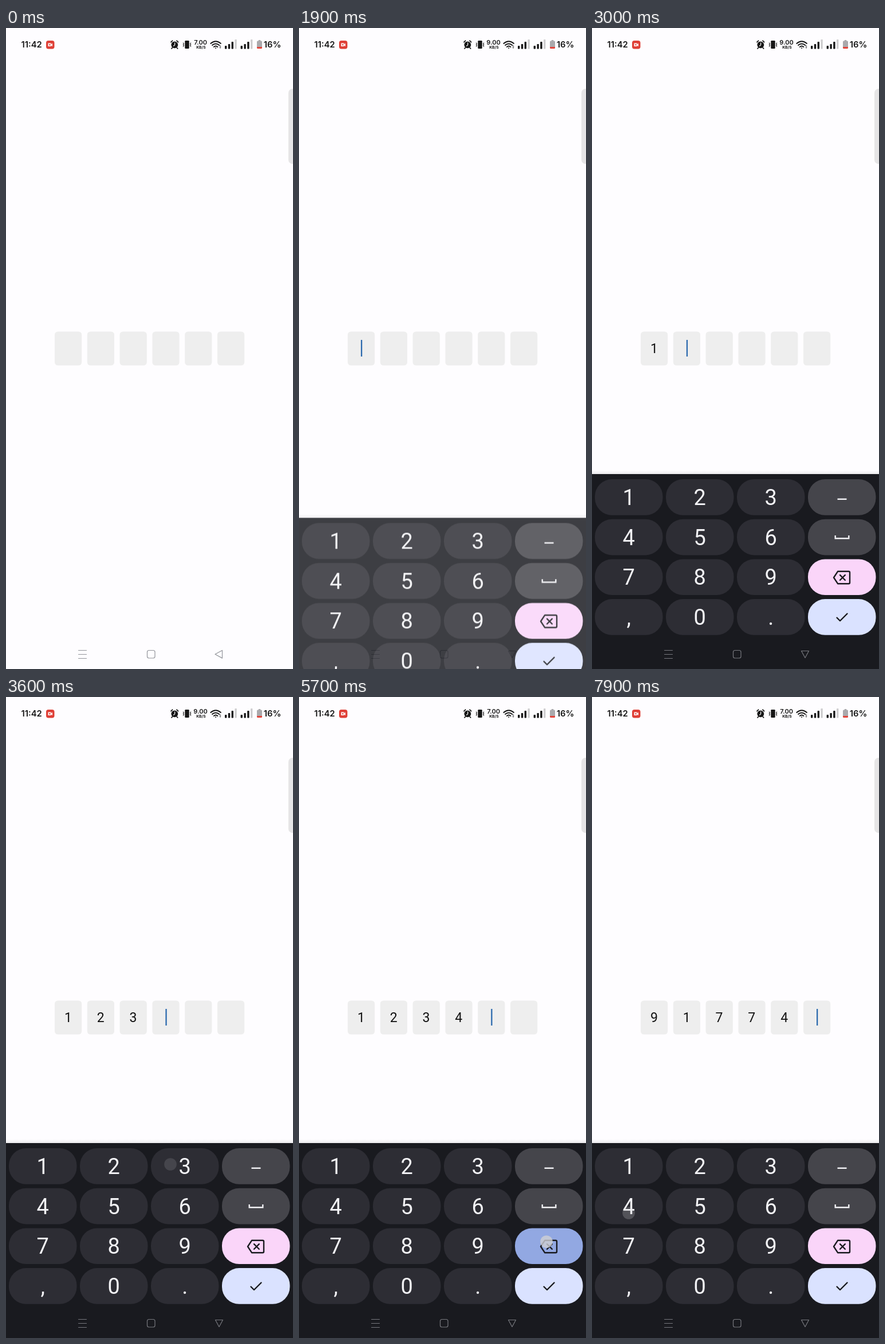
An HTML page that plays this animation: 501x1118 px, repeating every 8 s.

```html
<!DOCTYPE html>
<html lang="en">
<head>
<meta charset="utf-8">
<title>Code entry</title>
<style>
  html, body { margin: 0; width: 100%; height: 100%; overflow: hidden; background: #fefdff; }
  svg { display: block; width: 501px; height: 1118px; }
  text { font-family: Roboto, sans-serif; }
  .status text { font-family: Inter, sans-serif; font-weight: 600; fill: #161616; }
  .digit { font-size: 38px; fill: #f3f3f6; text-anchor: middle; }
  .cell { font-size: 23px; fill: #111; text-anchor: middle; }
  .line { fill: none; stroke-linecap: round; stroke-linejoin: round; }
</style>
</head>
<body>
<svg viewBox="0 0 501 1118">
  <defs>
    <linearGradient id="shade" x2="0" y2="1">
      <stop offset="0" stop-color="#000" stop-opacity="0"/>
      <stop offset="1" stop-color="#000" stop-opacity=".07"/>
    </linearGradient>
  </defs>
  <rect width="501" height="1118" fill="#fefdff"/>
  <g class="status">
    <text x="26.5" y="34" font-size="14.8">11:42</text>
    <rect x="70" y="22" width="14.5" height="14.5" rx="4" fill="#df4037"/>
    <path d="M73.5 26.5h5v1.7l2.5-1.5v5.2l-2.5-1.5v1.7h-5z" fill="#fff"/>
    <circle cx="76.3" cy="29.3" r="1.2" fill="#df4037"/>
    <g stroke="#161616" class="line">
      <circle cx="294.3" cy="29.3" r="5.9" fill="#161616" stroke="none"/>
      <path d="M288 24.6l2.6-2.5M300.6 24.6L298 22.1M290.3 34.5l-1.3 1.4M298.3 34.5l1.3 1.4" stroke-width="1.8"/>
      <path d="M294.6 25.8v3.8l-2 1.7" stroke="#fff" stroke-width="1.2"/>
      <rect x="312.3" y="22" width="7.4" height="14" rx="1.2" fill="#161616" stroke="none"/>
      <path d="M309.4 26l1 1.6-1 1.5 1 1.5-1 1.6M322.6 26l-1 1.6 1 1.5-1 1.5 1 1.6" stroke-width="1.1"/>
      <path d="M357.3 27Q366 19.3 375 27M360 30Q366 24.8 372.3 30M362.8 32.9Q366 30.3 369.4 32.9" stroke-width="1.9"/>
      <circle cx="366.1" cy="35" r="1" fill="#161616" stroke="none"/>
      <path d="M372.4 32.2l1.6-1.7 1.6 1.7zM372.4 33.8l1.6 1.7 1.6-1.7z" fill="#161616" stroke="none"/>
    </g>
    <text id="rate" x="339.6" y="29.2" font-size="11" text-anchor="middle"></text>
    <text x="340.4" y="35.7" font-size="6.8" text-anchor="middle" style="font-weight:700">KB/S</text>
    <g id="signal"></g>
    <path d="M438 24q0-1.5 1.5-1.5h1.3v-1.5h3.4v1.5h1.3q1.5 0 1.5 1.5v10h-9z" fill="#aaa9ac"/>
    <path d="M438 33h9v1.5q0 1.5-1.5 1.5h-6q-1.5 0-1.5-1.5z" fill="#e2453b"/>
    <text x="449.8" y="34.3" font-size="14.8">16%</text>
  </g>
  <rect x="493" y="106" width="20" height="131" rx="7" fill="#e6e5e6"/>
  <g id="cells"></g>
  <rect id="cursor" y="544" width="2.3" height="29" fill="#2c6aae"/>

  <g class="line" stroke="#92949a" stroke-width="1.2">
    <path d="M126.5 1085.5h14M126.5 1092.5h14M126.5 1099.5h14"/>
    <rect x="246.5" y="1085.5" width="13.5" height="13.5" rx="3"/>
    <path class="back"/>
  </g>

  <g id="board">
    <rect id="lip" width="501" height="7" fill="url(#shade)"/>
    <rect id="panel" width="501" fill="#191a1f"/>
    <g id="chip">
      <rect x="144" y="737" width="212" height="32.5" rx="7" fill="#27282e"/>
      <path d="M152.5 760.5v-15h15v11.5h-11.5z" class="line" stroke="#2473e6" stroke-width="1.8"/>
      <path d="M155.5 748.7h9M155.5 751.3h9M155.5 753.9h6.5" stroke="#2473e6" stroke-width="1.3"/>
      <text x="175" y="758.5" font-size="13.1" fill="#eeeef1">Autofill code</text>
      <text x="257.3" y="758" font-size="12.5" fill="#d6d6da">from messages</text>
    </g>
    <g id="keys"></g>
    <g class="line" stroke="#f0f0f3" stroke-width="2.4" style="stroke-linecap:butt;stroke-linejoin:miter">
      <path d="M428.5 821.7h16M424.7 885v5.3h23.6v-5.3"/>
    </g>
    <g class="line" stroke="#191a1f" stroke-width="2.4">
      <path d="M422 958.5l7-10.7h19q2 0 2 2v17.4q0 2-2 2h-19z"/>
      <path d="M433 954.2l8.8 8.8M441.8 954.2l-8.8 8.8"/>
      <path d="M427.5 1028.5l5.5 5.5 12.5-12.5"/>
    </g>
  </g>
  <g id="nav" class="line" stroke="#77787e" stroke-width="1.2">
    <path d="M126.5 1085.5h14M126.5 1092.5h14M126.5 1099.5h14"/>
    <rect x="246.5" y="1085.5" width="13.5" height="13.5" rx="3"/>
    <path class="back"/>
  </g>
  <g id="dots"></g>
</svg>
<script>
const LOOP = 8000, SLIDE = 1700, SLIDE_LEN = 400, HOLD = 100, FADE = 200;
const LABELS = ["1", "2", "3", "-", "4", "5", "6", "_", "7", "8", "9", "<", ",", "0", ".", "ok"];
const $ = id => document.getElementById(id);

function add(parent, tag, attrs, text = "") {
  const el = document.createElementNS("http://www.w3.org/2000/svg", tag);
  for (const name in attrs) el.setAttribute(name, attrs[name]);
  el.textContent = text;
  return parent.appendChild(el);
}

for (const x of [382, 409.6])
  [5.5, 8.5, 12.5, 16.5].forEach((h, i) =>
    add($("signal"), "rect", { x: x + i * 5.8, y: 36.5 - h, width: 3.4, height: h, rx: .8, fill: i < 3 ? "#161616" : "#cfced0" }));

const cells = [0, 1, 2, 3, 4, 5].map(i => {
  const x = 85 + i * 56.8;
  add($("cells"), "rect", { x, y: 529.5, width: 47.2, height: 59, rx: 5.5, fill: "#eeeeee" });
  return add($("cells"), "text", { x: x + 23.4, y: 567.3, class: "cell" });
});

const keys = {};
LABELS.forEach((label, i) => {
  const x = 5 + i % 4 * 124, y = 787 + (i >> 2) * 69.7;
  const fill = label === "<" ? "#fad5f9" : label === "ok" ? "#dae2ff" : i % 4 === 3 ? "#45454b" : "#2d2d34";
  const el = add($("keys"), "rect", { x, y, width: 118.5, height: 62.7, rx: 30, fill });
  if (i % 4 < 3) add($("keys"), "text", { x: x + 59.2, y: y + 45, class: "digit" }, label);
  keys[label] = { el, fill, lit: label === "<" ? "#92a8e2" : "#45454c" };
});

// time of press, key, touch point
const taps = [
  [2700, "1", 62, 822], [3040, "2", 184, 820], [3340, "3", 287, 815],
  [3700, "4", 62, 892], [4040, "5", 186, 892], [4360, "6", 306, 892],
  [4880, "<", 432, 952], [5250, "<", 433, 951], [5650, "<", 432, 950],
  [5900, "<", 432, 950], [6130, "<", 433, 951], [6350, "<", 432, 950],
  [6600, "9", 308, 944], [6770, "1", 58, 823], [7080, "7", 62, 960],
  [7350, "7", 63, 960], [7660, "4", 64, 900]
].map(([at, key, cx, cy]) => ({
  at, key, dot: add($("dots"), "circle", { cx, cy, r: 10.8, fill: "#cfcfd3" })
}));

function draw(t) {
  const p = Math.min(1, Math.max(0, (t - SLIDE) / SLIDE_LEN));
  const drop = 340 * (1 - p) ** 2.14;
  const shown = t >= SLIDE;
  $("board").setAttribute("transform", `translate(0 ${drop})`);
  $("board").style.opacity = shown ? 1 - drop / 480 : 0;
  $("nav").style.opacity = p === 1 ? 1 : 0;
  for (const el of document.querySelectorAll(".back"))
    el.setAttribute("d", shown ? "M365.5 1086.5h13l-6.5 12z" : "M365 1092.3l12.5-6.8v13.6z");

  const hint = t >= 2200 && t < 2800;
  const top = hint ? 726 : 778;
  $("panel").setAttribute("y", top);
  $("panel").setAttribute("height", 1118 - top);
  $("lip").setAttribute("y", top - 7);
  $("chip").style.opacity = hint ? Math.min(1, (t - 2200) / 100) : 0;

  let code = "", changed = SLIDE;
  for (const name in keys) keys[name].el.setAttribute("fill", keys[name].fill);
  for (const { at, key, dot } of taps) {
    const since = t - at - HOLD;
    if (since >= 0) {
      code = key === "<" ? code.slice(0, -1) : code + key;
      changed = at + HOLD;
    } else if (t >= at) keys[key].el.setAttribute("fill", keys[key].lit);
    dot.style.opacity = t < at ? 0 : .8 * Math.max(0, 1 - Math.max(0, since) / FADE);
  }
  cells.forEach((cell, i) => cell.textContent = code[i] || "");
  const blink = Math.floor((t - changed) / 500) % 2 === 0;
  $("cursor").setAttribute("x", 108 + code.length * 56.8);
  $("cursor").style.opacity = shown && blink && code.length < 6 ? 1 : 0;
  $("rate").textContent = t >= 900 && t < 4900 ? "9.00" : "7.00";
}

const start = performance.now();
function tick() {
  draw((performance.now() - start) % LOOP);
  requestAnimationFrame(tick);
}
tick();
</script>
</body>
</html>
```
